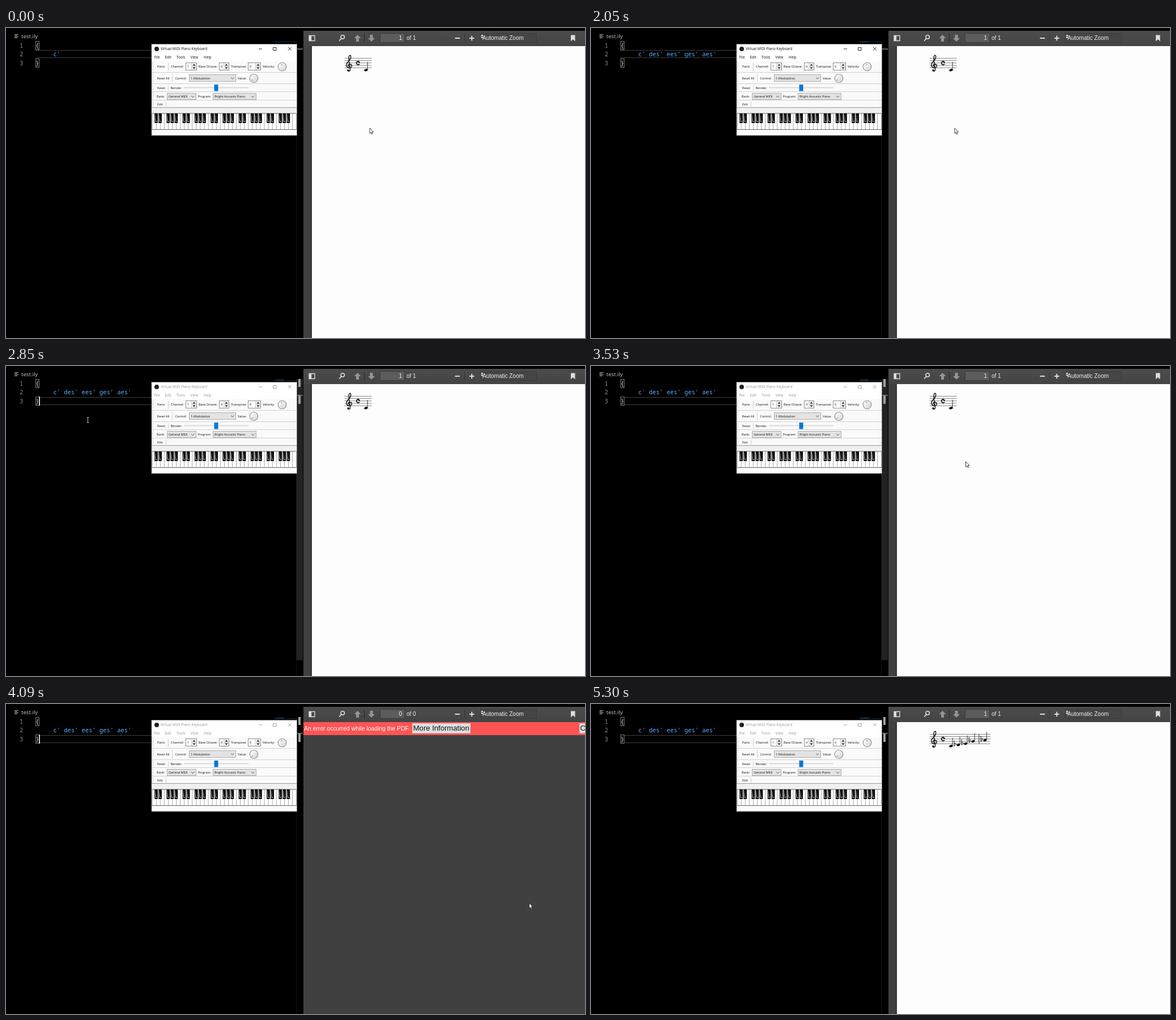
Recreate the animation shown at these times as an HTML page with a canvas. Size 1022 by 548 pixels, loop 5.4 s.

```html
<!DOCTYPE html>
<html lang="en">
<head>
<meta charset="utf-8">
<title>Piano input into a score</title>
<style>
html, body { margin: 0; width: 100%; height: 100%; overflow: hidden; background: #000; }
canvas { display: block; }
</style>
</head>
<body>
<canvas id="stage" width="1022" height="548"></canvas>
<script>
const c = document.getElementById('stage').getContext('2d');
const LOOP = 5400;
const UI = '"Open Sans", "Noto Sans", sans-serif';
const ARIAL = '"Liberation Sans", Arial, sans-serif';
const MONO = '"Noto Sans Mono", "DejaVu Sans Mono", monospace';

function rect(x, y, w, h, fill) { c.fillStyle = fill; c.fillRect(x, y, w, h); }
function box(x, y, w, h, fill, edge) {
  rect(x, y, w, h, edge);
  rect(x + 1, y + 1, w - 2, h - 2, fill);
}
function text(s, x, y, size, color, font = UI, align = 'left') {
  c.font = `${size}px ${font}`;
  c.textAlign = align;
  c.fillStyle = color;
  c.fillText(s, x, y);
}
function stroke(d, color, width = 1) {
  c.strokeStyle = color;
  c.lineWidth = width;
  c.stroke(new Path2D(d));
}
function fill(d, color) { c.fillStyle = color; c.fill(new Path2D(d)); }
function disc(x, y, r, color) {
  c.beginPath();
  c.arc(x, y, r, 0, 7);
  c.fillStyle = color;
  c.fill();
}

// Typed notes: name, time the key goes down, time the text appears, black key index
const typed = [
  ['des', 560, 710, 0], ['ees', 1110, 1260, 1],
  ['ges', 1510, 1630, 2], ['aes', 1910, 2050, 3]
];
const FOCUS = 2850;

function editor(t) {
  const focused = t >= FOCUS;
  const code = "c'" + typed.filter(n => t >= n[2]).map(n => ` ${n[0]}'`).join('');

  stroke('M15 11.5H22M15 13.5H20M15 15.5H22M15 17.5H20', '#c5c5c5', 0.9);
  text('test.ily', 27, 18, 9.7, '#c8c8c8');

  const top = focused ? 55 : 39;
  stroke(`M52 ${top + 0.5}H513M52 ${top + 13.5}H513`, '#3e3e3e');
  for (let i = 0; i < 3; i++) text(i + 1, 24, 34.5 + i * 15.7, 10.4, '#8a8a8a', MONO);
  for (const [s, y] of [['{', 23], ['}', 54]]) {
    box(52, y, 7, 16, '#0a0a0a', '#777');
    text(s, 52.2, y + 11.7, 10.4, '#d8d8d8', MONO);
  }
  text(code, 83.5, 50.3, 10.45, '#58aeff', MONO);

  const caret = focused && !(t >= 3400 && t < 3820) && !(t >= 4240 && t < 4630) && t < 5300;
  if (caret) rect(58, 54, 2, 16, '#d0d0d0');

  // Minimap and overview ruler
  rect(473, focused ? 25.5 : 24, 40, 1, '#10324c');
  for (let i = 0; i < code.length; i++)
    if (code[i] !== ' ') rect(476 + i * 0.63, 24, 0.5, 1.2, '#3b79b0');
  rect(512, 23, 1, 525, '#151515');
  c.globalAlpha = t >= 2450 ? Math.max(0, Math.min(1, (4000 - t) / 320)) : 0;
  rect(513, 23, 11, 497, '#222');
  c.globalAlpha = 1;
  if (focused) {
    rect(516, 23, 4, 14, '#a0a0a0');
    rect(516, 52, 4, 15, '#a0a0a0');
    rect(513, 51, 11, 1.5, '#777');
  } else rect(513, 36.5, 11, 1.5, '#8a8a8a');
}

function spin(x, w, value) {
  box(x, 61, w, 14, '#fff', '#8c8c8c');
  text(value, x + 3, 70, 5.5, '#111');
  rect(x + w - 9, 62, 8, 12, '#f0f0f0');
  const m = x + w - 5;
  stroke(`M${m - 4.5} 62V74M${m - 4} 68H${m + 4}`, '#bbb', 0.7);
  fill(`M${m - 2.5} 66.5h5l-2.5 -3zM${m - 2.5} 69.5h5l-2.5 3z`, '#222');
}
function combo(x, y, w, h, label) {
  box(x, y, w, h, '#e3e3e3', '#adadad');
  text(label, x + 3, y + h / 2 + 2, 5.5, '#111');
  stroke(`M${x + w - 9} ${y + h / 2 - 1}l2.7 2.5l2.7 -2.5`, '#444', 0.9);
}
function knob(x, y, dx, dy) {
  disc(x, y, 7.8, '#777');
  const g = c.createLinearGradient(x - 6, y - 6, x + 6, y + 6);
  g.addColorStop(0, '#fff');
  g.addColorStop(1, '#d4d4d4');
  disc(x, y, 6.9, g);
  disc(x + dx, y + dy, 1.2, '#aaa');
}

function piano(t) {
  const x0 = 258, white = 7.07;
  rect(257.5, 141, 255.5, 10, '#f0f0f0');
  rect(x0, 151, 254.5, 29, '#fff');
  for (let i = 0; i <= 36; i++) rect(x0 + i * white - 0.3, 151, 0.7, 29, '#888');
  rect(x0, 150.5, 254.5, 1, '#666');
  rect(x0, 179, 254.5, 1, '#666');
  const offsets = [4.2, 11.3, 25.4, 32.5, 39.6];
  for (let octave = 0; octave < 5; octave++) offsets.forEach((dx, k) => {
    const x = x0 + octave * 7 * white + dx;
    const down = octave === 1 && typed.some(n => n[3] === k && t >= n[1] && t < n[2]);
    rect(x, 151, 5.7, 17, down ? '#0078d7' : '#0a0a0a');
    if (down) return;
    const g = c.createLinearGradient(0, 152, 0, 166);
    g.addColorStop(0, '#222');
    g.addColorStop(0.75, '#aaa');
    g.addColorStop(1, '#555');
    rect(x + 1, 152, 1.2, 13, g);
    rect(x + 1.2, 164.5, 3.4, 1.2, '#aaa');
  });
}

function keyboardWindow(t) {
  const active = t < FOCUS;
  const ink = active ? '#111' : '#999';
  box(256.5, 28, 257.5, 162.5, '#fafafa', '#777');
  rect(257.5, 29, 255.5, 29, '#fff');
  disc(266, 37, 4, '#2a1d1d');
  text('Virtual MIDI Piano Keyboard', 273, 39.2, 6.3, ink);
  stroke('M446 37H452M471.5 34.5h5.5v5h-5.5zM498 34l5.5 5.5M503.5 34l-5.5 5.5', ink, 0.9);
  [['File', 261.5], ['Edit', 280.5], ['Tools', 301], ['View', 325.5], ['Help', 349]]
    .forEach(([s, x]) => text(s, x, 54.2, 6.3, ink));

  for (const y of [78, 98, 112, 127, 140]) rect(257.5, y, 255.5, 1, y === 140 ? '#999' : '#d0d0d0');
  for (const [y, h] of [[60, 16], [80, 16], [100, 11], [114, 12], [129, 10]])
    for (let i = 0; i < h; i += 2) rect(259.5, y + i, 1, 1, '#c4c4c4');
  stroke('M286.5 61V76M293.5 81V96M286.5 101V111M282.5 130V139', '#d0d0d0');

  const labels = [
    ['Panic', 267, 70], ['Channel:', 291, 70], ['Base Octave:', 340, 70],
    ['Transpose:', 397, 70], ['Velocity:', 453, 70],
    ['Reset All', 266.5, 90.5], ['Control:', 298.5, 90.5], ['Value:', 409, 90.5],
    ['Reset', 267, 108], ['Bender:', 290.5, 108],
    ['Bank:', 266, 122.8], ['Program:', 338.5, 122.8], ['Edit', 267, 136.7]
  ];
  for (const [s, x, y] of labels) text(s, x, y, 5.5, '#111');
  spin(317, 20, '1');
  spin(376, 18, '4');
  spin(427, 23, '0');
  combo(323, 82, 83, 13, '1-Modulation');
  combo(284, 115, 52, 12, 'General MIDI');
  combo(365, 115, 77, 12, 'Bright Acoustic Piano');
  knob(487.5, 68.5, -1, -4);
  knob(437.5, 89, -3, 3);
  rect(314, 104.5, 114, 2, '#dadada');
  rect(367.5, 100, 7, 11.5, '#0078d7');
  piano(t);
}

function viewerBar(page) {
  const g = c.createLinearGradient(0, 5, 0, 31);
  g.addColorStop(0, '#4c4c4c');
  g.addColorStop(1, '#444');
  rect(525, 5, 497, 27, g);
  stroke('M535 13.5h10v9h-10zM538.5 13.5v9', '#ddd', 1.3);
  rect(535, 13, 3.5, 10, '#ddd');
  stroke('M597.4 16a3.2 3.2 0 1 0 -6.4 0a3.2 3.2 0 1 0 6.4 0M591.7 18.6l-3.5 4', '#ddd', 1.6);
  fill('M620.5 12l6 6h-3.5v6h-5v-6h-3.5z', '#959595');
  fill('M645 24l6 -6h-3.5v-6h-5v6h-3.5z', '#959595');
  rect(632, 10, 1, 15, '#292929');
  box(660, 9, 44, 17, '#5c5c5c', '#3a3a3a');
  text(page, 699, 21.2, 10, '#eee', ARIAL, 'right');
  text('of ' + page, 707, 21.2, 10, '#eee', ARIAL);
  rect(792.5, 17, 8.5, 2, '#ddd');
  rect(818, 17, 8.5, 2, '#ddd');
  rect(821.2, 13.8, 2, 8.5, '#ddd');
  rect(809, 11, 1, 14, '#363636');
  box(837, 9, 100, 17, '#454545', '#3c3c3c');
  fill('M838 14.2h4.6l-2.3 -3zM838 15.6h4.6l-2.3 3z', '#eee');
  text('Automatic Zoom', 841, 20.5, 10, '#eee', ARIAL);
  fill('M997 12.5h7.5v11l-3.75 -3.5l-3.75 3.5z', '#ddd');
}

function score(full) {
  const right = full ? 705 : 645.5, step = 2.1, c4 = 74.4;
  for (let i = 2; i <= 10; i += 2) rect(597.5, c4 - i * step - 0.35, right - 597.5, 0.7, '#555');
  // Treble clef
  stroke('M606.5 68.3C603.3 67.8 603.5 63.8 606.8 63.8C611.3 63.8 611.8 70.4 606.5 70.4' +
    'C600.2 70.4 599.8 64 603 60.5C606.5 57 609 54.5 608.7 50.5C608.4 47 606.3 47.3 605.2 51' +
    'C604.3 54 606.9 68 607.5 73C607.9 77 603.5 77.5 603 74.6', '#000', 1.3);
  disc(604, 74.6, 1.5, '#000');
  // Common time
  stroke('M623.3 59.8C621.8 58 618.8 58.8 618.8 62C618.8 65.4 621.8 66 624 63.8', '#000', 1.6);
  disc(623.4, 60.7, 1.3, '#000');
  rect(631.5, c4 - 0.4, 8, 0.8, '#222');
  const notes = [[635.3, 0], [648.3, 1], [661.3, 2], [674.3, 4], [695.5, 5]];
  notes.slice(0, full ? 5 : 1).forEach(([x, degree], i) => {
    const y = c4 - degree * step;
    c.beginPath();
    c.ellipse(x, y, 3, 2, -0.4, 0, 7);
    c.fillStyle = '#000';
    c.fill();
    rect(x + 2.4, y - 14.5, 0.8, 14, '#111');
    if (i) stroke(`M${x - 7.2} ${y - 7.5}v9.7c2.3 -1.5 3.5 -2.8 3.1 -4c-.4 -1.2 -2 -.9 -3.1 .4`, '#000', 0.9);
  });
  if (full) rect(684.4, c4 - 10 * step, 0.9, 8 * step, '#111');
}

function viewer(t) {
  const failed = t >= 4090 && t < 4240;
  rect(525, 5, 497, 543, '#404040');
  viewerBar(failed ? 0 : 1);
  if (!failed) {
    rect(537, 32, 3, 516, '#383838');
    rect(540, 32, 482, 516, '#fdfdfd');
    score(t >= 4240);
    return;
  }
  rect(525, 32, 497, 23, '#ff5454');
  text('An error occurred while loading the PDF.', 526, 47, 10.4, '#fff', ARIAL);
  box(717, 34, 103, 18, '#dedede', '#d0c8c8');
  text('More Information', 718.7, 47.2, 13.1, '#111', ARIAL);
  box(1012, 34, 42, 18, '#dedede', '#d0c8c8');
  text('Close', 1013.5, 47.2, 13.1, '#111', ARIAL);
}

// Pointer stops: time, x, y
const stops = [
  [0, 642, 177], [2330, 520, 184], [2450, 330, 194], [2580, 164, 193], [2720, 144.5, 95.5],
  [3280, 240, 76], [3400, 480, 90], [3530, 661.5, 169], [3680, 694, 191], [3820, 800, 255],
  [3940, 897, 311], [4090, 923.5, 352], [4240, 952.5, 423], [4360, 970, 465], [4490, 981, 493],
  [4630, 986, 502], [4750, 986, 503], [4900, 990, 518], [5020, 997, 538], [5150, 1003, 560]
];
function pointer(t) {
  const [, x, y] = stops.findLast(s => t >= s[0]);
  const overWindow = x > 256 && x < 514 && y > 28 && y < 190;
  if (x < 512 && !overWindow) {
    stroke(`M${x - 2} ${y - 4.5}h4M${x - 2} ${y + 4.5}h4M${x} ${y - 4.5}v9`, '#ccc', 0.9);
    return;
  }
  const arrow = `M${x} ${y}v9.3l2.1 -1.9l1.5 3.3l1.5 -.7l-1.5 -3.2h2.9z`;
  fill(arrow, '#fff');
  stroke(arrow, '#111', 0.8);
  if (t >= 3820 && t < 4090) {
    disc(x + 7.5, y + 0.5, 4.8, '#1689d8');
    disc(x + 7.5, y + 0.5, 2.6, '#f4faff');
  }
}

function draw() {
  const t = performance.now() % LOOP;
  rect(0, 0, 1022, 548, '#000');
  editor(t);
  keyboardWindow(t);
  viewer(t);
  pointer(t);
  requestAnimationFrame(draw);
}
draw();
</script>
</body>
</html>
```
